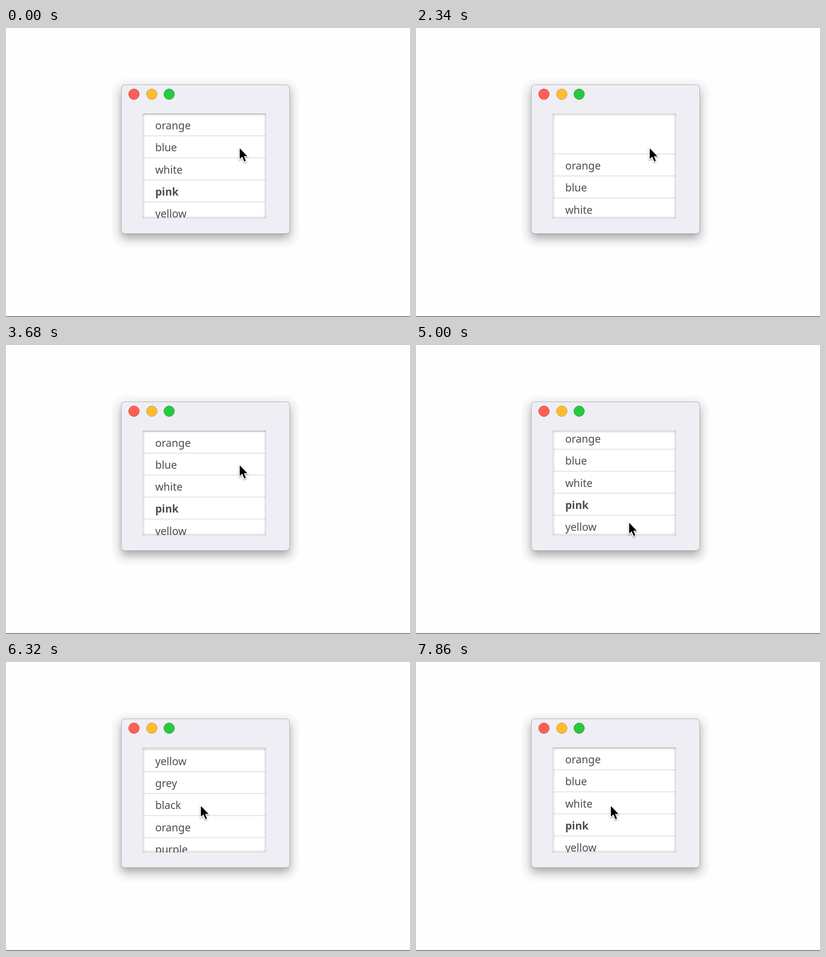
These frames come from a looping animation (884x633 px, 8000 ms). An HTML page:

```html
<!DOCTYPE html>
<html lang="en">
<head>
<meta charset="utf-8">
<title>Elastic list</title>
<style>
  html, body { margin: 0; width: 100%; height: 100%; overflow: hidden; background: #fefefe; }
  div, svg { position: absolute; box-sizing: border-box; }
  #halo { left: 232px; top: 110px; width: 409px; height: 371px; border-radius: 32px; background: #fafafa; }
  #window {
    left: 252px; top: 124px; width: 369px; height: 327px; border-radius: 8px;
    background: #eeeef4; border: 1px solid #b2b2b5; border-bottom-color: #9a9a9c;
    box-shadow: 0 9px 20px rgba(0, 0, 0, .34);
  }
  .light { top: 133px; width: 24px; height: 24px; border-radius: 50%; border: 1px solid; }
  #list { left: 299px; top: 187px; width: 270px; height: 230px; overflow: hidden; background: #fff; }
  #shade {
    inset: 0; border-top: 1px solid rgba(0, 0, 0, .14);
    box-shadow: inset 0 0 6px rgba(0, 0, 0, .36);
  }
  #floor { left: 0; top: 631px; width: 884px; height: 2px; background: #858287; }
  text { font: 23.2px "Noto Sans", "Open Sans", sans-serif; fill: #4e4e4e; }
  .bold { font-weight: 700; }
</style>
</head>
<body>
<div id="halo"></div>
<div id="window"></div>
<div class="light" style="left:268px;background:#ff5f57;border-color:#d33f38"></div>
<div class="light" style="left:306.5px;background:#ffbd2e;border-color:#c3953c"></div>
<div class="light" style="left:345px;background:#28c940;border-color:#24a038"></div>
<div id="list">
  <svg width="270" height="230"><g id="rows"></g></svg>
  <div id="shade"></div>
</div>
<div id="floor"></div>
<svg width="884" height="633">
  <g id="cursor">
    <path d="M0 0V26.5L6 21L10.5 31L15 29L10.5 19H18.5Z" transform="translate(-1.5 -2)"
      fill="#000" stroke="#fff" stroke-width="2.4" stroke-linejoin="round"
      style="filter:drop-shadow(0 2px 1.5px rgba(0,0,0,.35))"/>
    <path d="M0 0V23L5.2 18L9.5 28.5L13 27L8.8 17H16.2Z" fill="#000"/>
  </g>
</svg>
<script>
const LOOP = 8000, PITCH = 48.2, OMEGA = 8.8, BOTTOM = -189;
const RELEASE = 2875, TOP_HIT = 7060;
const colours = ['orange', 'blue', 'white', 'pink', 'yellow', 'grey', 'black', 'orange', 'purple'];
const rows = document.getElementById('rows');
const cursor = document.getElementById('cursor');

const separator = y => `<rect x="2" y="${y}" width="267" height="2" fill="#e3e3e3"/>`;
rows.innerHTML = colours.map((name, i) => {
  const top = i * PITCH;
  return `${separator(top)}
    <text x="27.4" y="${top + 35.2}"${name === 'pink' ? ' class="bold"' : ''}>${name}</text>`;
}).join('') + separator(colours.length * PITCH);

// Rubber-band resistance while the list is held past its top.
const pull = ms => 110 * (1 - Math.exp(-(ms - 1020) / 822));

function scrollAt(ms) {
  const phase = (start, rate = OMEGA) => rate * (ms - start) / 1000;
  if (ms < 1040) return 0;
  if (ms < RELEASE) return pull(ms);
  if (ms < 3700) {
    const x = phase(RELEASE);
    return pull(RELEASE) * (1 + x) * Math.exp(-x);
  }
  if (ms < 5000) return 0;
  if (ms < 6060) {
    const x = phase(4980, 7);
    return BOTTOM * (1 - (1 + .73 * x) * Math.exp(-x));
  }
  if (ms < 6680) return BOTTOM;
  if (ms < TOP_HIT) return BOTTOM * (1 - ((ms - 6660) / 400) ** 2.35);
  if (ms < 7860) {
    const x = phase(TOP_HIT);
    return 133 * x * Math.exp(-x);
  }
  return 0;
}

function glide(ms, start, end) {
  const p = Math.min(1, Math.max(0, (ms - start) / (end - start)));
  return p * p * (3 - 2 * p);
}

function frame(now) {
  const ms = Math.floor(now % LOOP / 20) * 20;
  const down = glide(ms, 4040, 4340), up = glide(ms, 6180, 6320);
  rows.setAttribute('transform', `translate(0 ${scrollAt(ms)})`);
  cursor.setAttribute('transform', `translate(${511.8 - 45 * down - 40 * up} ${263.8 + 126 * down - 74 * up})`);
  requestAnimationFrame(frame);
}
frame(0);
</script>
</body>
</html>
```
